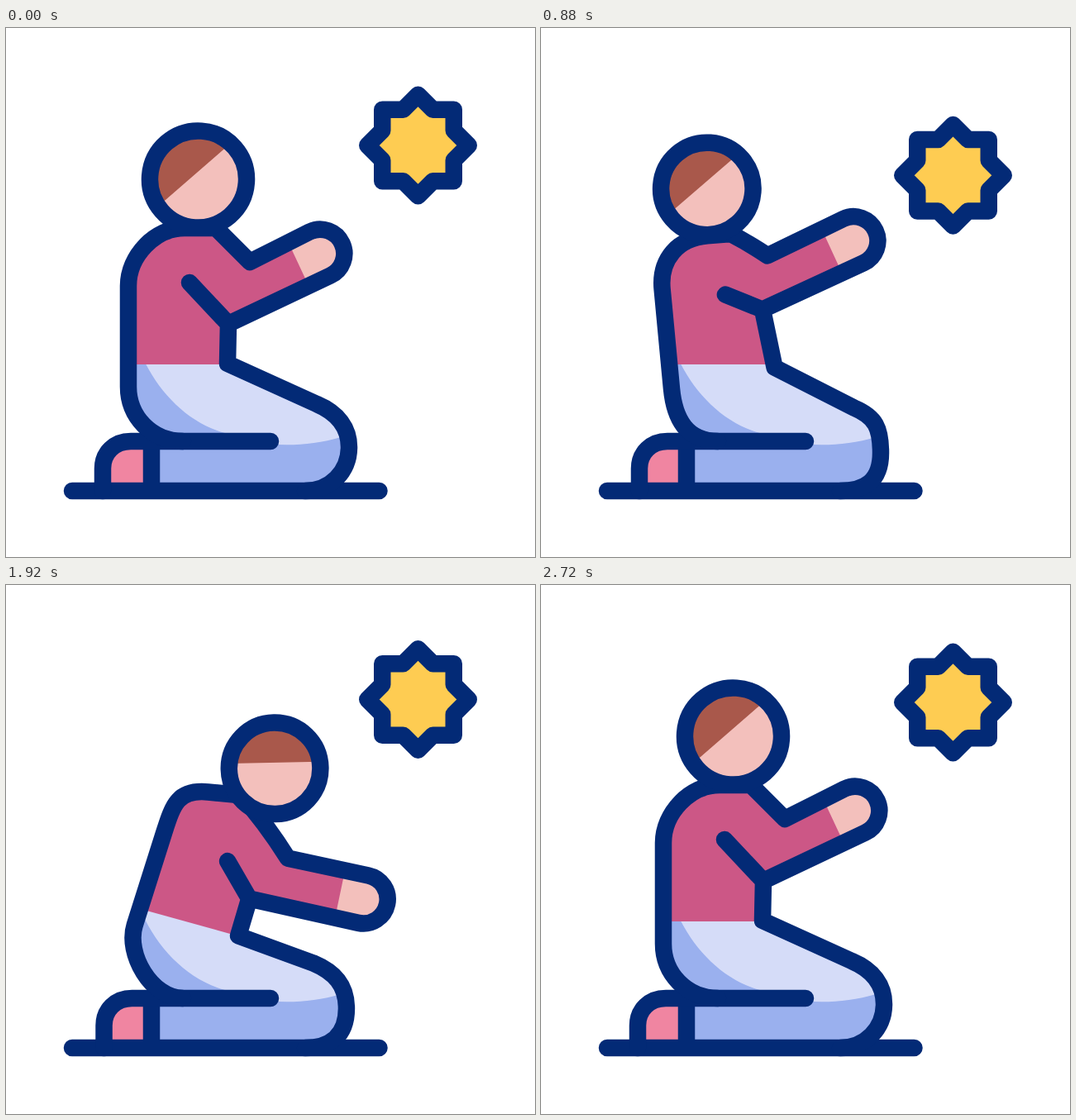
These frames come from a looping animation (640x640 px, 3 s). An HTML page:

```html
<!DOCTYPE html>
<html lang="en">
<head>
<meta charset="utf-8">
<title>Kneeling figure</title>
<style>
  html, body { margin: 0; width: 100%; height: 100%; overflow: hidden; background: #fff; }
  svg { display: block; width: 100vw; height: 100vh; }
  .line { fill: none; stroke: #032a76; stroke-width: 20.5; stroke-linecap: round; stroke-linejoin: round; }
</style>
</head>
<body>
<svg viewBox="0 0 640 640">
  <defs>
    <clipPath id="legClip"><path id="legs"/></clipPath>
    <clipPath id="beltClip"><rect id="belt" y="407" width="640" height="300"/></clipPath>
  </defs>
  <path id="star" class="line" style="fill:#fecc52"/>
  <path id="footFill" fill="#f085a1"/>
  <path id="shirt" fill="#cc5786"/>
  <g clip-path="url(#legClip)"><g clip-path="url(#beltClip)">
    <rect width="640" height="640" fill="#d5dcf8"/>
    <path fill="#9ab0ee" d="M150 360L165 398C184 440 220 478 265 490C300 506 355 510 405 495L460 470V600H100V380Z"/>
  </g></g>
  <path id="hand" fill="#f3c0bc"/>
  <path class="line" d="M80 560H451.500M176 500V560"/>
  <path id="foot" class="line"/>
  <path id="outline" class="line"/>
  <g id="head">
    <circle id="face" fill="#f3c0bc"/>
    <path id="hair" fill="#a9584b"/>
    <circle id="ring" class="line"/>
  </g>
</svg>
<script>
const LOOP = 3000, STEP = 40, END = 2720;
const ARM = 29.3, HEAD = 58.5;

// Joints as x, y; turn is the arm angle; curl, squash and nod are amounts.
const rest = {
  hip: [148, 434], shoulder: [148, 312], top: [216, 242], neck: [254, 242],
  elbow: [295, 283], palm: [380, 273], under: [269, 358], inner: [222, 308],
  lap: [268, 406], thigh: [376, 455], head: [232.5, 183],
  turn: [-25], curl: [0], squash: [0], nod: 0
};
const lifted = {
  hip: [158, 444], shoulder: [133, 321], top: [189, 251], neck: [218, 247],
  elbow: [255, 259], palm: [364, 221], under: [260, 330], inner: [209, 318],
  lap: [282, 406], thigh: [381, 460], head: [165, 189],
  turn: [-36], curl: [0], squash: [1], nod: 0
};
const bowed = {
  hip: [158, 405], shoulder: [204.5, 295], top: [253, 253], neck: [280, 258],
  elbow: [355, 345], palm: [438, 412.5], under: [302, 386], inner: [282, 342],
  lap: [285, 430], thigh: [370, 458], head: [353, 240],
  turn: [23], curl: [9], squash: [1], nod: 1
};
// bob raises and shrinks the head midway, swing carries neck and hand forward.
const phases = [
  { start: 0, end: 720, from: rest, to: lifted, ease: 1, bob: 0, swing: 0 },
  { start: 720, end: 1560, from: lifted, to: bowed, ease: 1, bob: 1, swing: 0 },
  { start: 1560, end: END, from: bowed, to: rest, ease: 1.25, bob: 1, swing: 1 }
];
const sunPath = [[0, 142], [900, 179], [1340, 114], [2000, 142], [LOOP, 142]];

const $ = id => document.getElementById(id);
const draw = (id, d) => $(id).setAttribute('d', d);
const mix = (a, b, u) => a + (b - a) * u;
const mixAll = (a, b, u) => a.map((v, i) => mix(v, b[i], u));

// The point at a given distance beyond b on the line from a.
function beyond(a, b, distance) {
  return mixAll(a, b, 1 + distance / Math.hypot(b[0] - a[0], b[1] - a[1]));
}

function track(keys, t) {
  const i = Math.max(1, keys.findIndex(k => k[0] >= t));
  const [t0, a] = keys[i - 1], [t1, b] = keys[i];
  return mix(a, b, (t - t0) / (t1 - t0));
}

function poseAt(t) {
  const { start, end, from, to, ease, bob, swing } = phases.find(f => t <= f.end);
  const time = (t - start) / (end - start), u = time ** ease, mid = u * (1 - u);
  const p = { nod: mix(from.nod, to.nod, time ** 3), radius: HEAD - 18 * mid * bob };
  for (const name in from) if (name !== 'nod') p[name] = mixAll(from[name], to[name], u);
  p.head[1] -= 28 * mid * bob;
  p.palm[0] += 44 * mid * swing;
  p.neck[0] += 56 * mid * swing;
  return p;
}

function starPath(cy) {
  const cx = 498.5, side = 43.25, notch = 18, tip = side + notch;
  const pts = [];
  for (let q = 0; q < 4; q++) {
    const c = Math.round(Math.cos(q * Math.PI / 2)), s = Math.round(Math.sin(q * Math.PI / 2));
    for (const [x, y] of [[0, -tip], [notch, -side], [side, -side], [side, -notch]])
      pts.push([cx + x * c - y * s, cy + x * s + y * c]);
  }
  return 'M' + pts.join('L') + 'Z';
}

function drawLegs(p, hip, knee) {
  const fx = 117 + 2 * p.squash[0];
  const foot = `M${fx} 560V533C${fx} 514 ${fx + 14} 500 ${fx + 34} 500`;
  draw('footFill', foot + 'H176V560Z');
  draw('foot', foot + 'H320');
  draw('legs', `M176 560V500H214${hip}L${p.shoulder}L${p.under}L${p.lap}${knee}Z`);
  $('belt').setAttribute('transform', `rotate(${16 * p.nod} 217 407)`);
}

function drawTorso(p, hip, knee) {
  const rad = p.turn[0] * Math.PI / 180, dx = Math.cos(rad), dy = Math.sin(rad);
  const onArm = (along, across) => [
    p.palm[0] + along * dx - across * dy,
    p.palm[1] + along * dy + across * dx
  ];
  const grip = `${onArm(0, -ARM)}A${ARM} ${ARM} 0 0 1 ${onArm(0, ARM)}`;
  const bend = mixAll(p.neck, p.elbow, 0.5);
  bend[1] -= p.curl[0];
  const spine = `L${p.shoulder}C${beyond(p.hip, p.shoulder, 36)} ${beyond(p.neck, p.top, 36)} ${p.top}`
    + `L${p.neck}Q${bend} ${p.elbow}L${grip}L${p.under}`;
  draw('shirt', `M${p.hip}${spine}L${p.lap}Z`);
  draw('hand', `M${onArm(-29, -ARM)}L${grip}L${onArm(-29, ARM)}Z`);
  draw('outline', `M214 500${hip}${spine}L${p.lap}${knee}M${p.inner}L${p.under}`);
}

function drawHead(p) {
  const r = p.radius, part = 7, half = Math.sqrt(r * r - part * part);
  $('head').setAttribute('transform', `translate(${p.head}) rotate(${41 * p.nod - 41})`);
  $('face').setAttribute('r', r);
  $('ring').setAttribute('r', r);
  draw('hair', `M${-half} ${-part}A${r} ${r} 0 0 1 ${half} ${-part}Z`);
}

function render(t) {
  const p = poseAt(t), k = p.squash[0], kx = 415 - 4 * k;
  const hip = `C176 500 ${beyond(p.shoulder, p.hip, 36)} ${p.hip}`;
  const knee = `L${p.thigh}C${p.thigh[0] + 26} ${p.thigh[1] + 11} ${kx} 484 ${kx} ${507 + 7 * k}`
    + `C${kx} ${537 + 11 * k} 392 560 362 560`;
  draw('star', starPath(track(sunPath, t)));
  drawLegs(p, hip, knee);
  drawTorso(p, hip, knee);
  drawHead(p);
}

const begin = performance.now();
function tick() {
  const t = (performance.now() - begin) % LOOP;
  render(Math.min(END, Math.floor(t / STEP) * STEP));
  requestAnimationFrame(tick);
}
tick();
</script>
</body>
</html>
```
